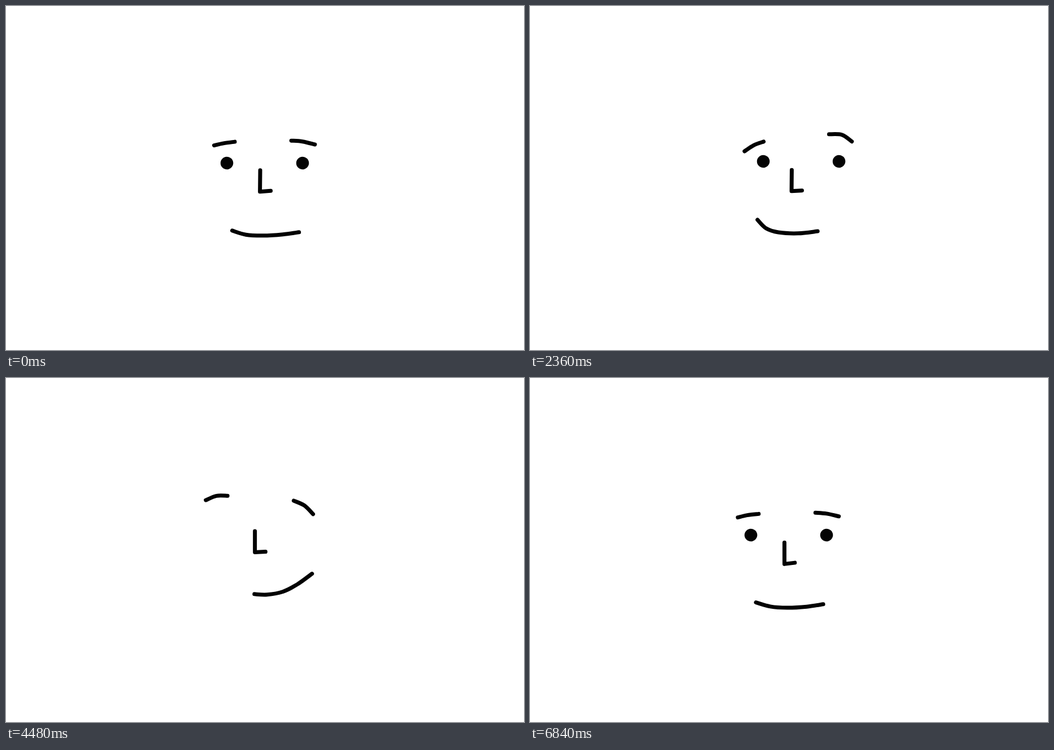
An HTML page that plays this animation: 917x611 px, repeating every 6880 ms.

```html
<!DOCTYPE html>
<html lang="en">
<head>
<meta charset="utf-8">
<title>Face</title>
<style>
  html, body { margin: 0; width: 100%; height: 100%; overflow: hidden; background: #fff; }
  svg { display: block; width: 100vw; height: 100vh; }
  .line { fill: none; stroke: #020202; stroke-width: 7; stroke-linecap: round; stroke-linejoin: round; }
  .eye { fill: #040404; }
</style>
</head>
<body>
<svg viewBox="0 0 917 611">
  <path class="line" id="browL"/>
  <path class="line" id="browR"/>
  <path class="line" id="nose"/>
  <path class="line" id="mouth"/>
  <path class="eye" id="eyeL"/>
  <path class="eye" id="eyeR"/>
</svg>
<script>
const LOOP = 6880, STEP = 40, EYE_R = 11.3, EYE_GAP = 134, LID_TILT = -13;
const el = id => document.getElementById(id);

// Flat x,y lists; eye is the left eye's offset from the top of the nose.
const POSES = {
  calm: {
    browL: [368, 248, 385, 244, 405, 241], browR: [505, 239, 525, 241, 547, 246],
    nose: [450, 292], eye: [-59, -13],
    mouth: [400, 399, 425, 406, 455, 408, 490, 406, 519, 402]
  },
  dip: {
    browL: [365, 288, 384, 287, 402, 286], browR: [493, 280, 514, 280, 536, 282],
    nose: [440, 311], eye: [-59, -13],
    mouth: [391, 414, 412, 418, 440, 417, 472, 416, 510, 417]
  },
  glad: {
    browL: [380, 258, 396, 247, 414, 241], browR: [529, 228, 552, 229, 570, 241],
    nose: [463, 291], eye: [-50, -15],
    mouth: [403, 380, 418, 395, 440, 402, 475, 404, 509, 400]
  },
  squint: {
    browL: [391, 262, 410, 259, 429, 258], browR: [519, 250, 542, 250, 561, 256],
    nose: [465, 296], eye: [-51, -6],
    mouth: [409, 390, 427, 401, 450, 405, 485, 405, 520, 403]
  },
  beam: {
    browL: [354, 217, 373, 209, 392, 209], browR: [509, 218, 528, 226, 544, 242],
    nose: [441, 272], eye: [-50, -13],
    mouth: [440, 384, 462, 385, 490, 379, 516, 366, 542, 348]
  },
  lift: {
    browL: [365, 238, 384, 238, 403, 240], browR: [482, 237, 504, 236, 525, 239],
    nose: [435, 268], eye: [-59, -13],
    mouth: [434, 381, 458, 382, 485, 375, 512, 362, 536, 343]
  }
};

const EASE = {
  both: p => p * p * (3 - 2 * p),
  in: p => p * p,
  out: p => 1 - (1 - p) ** 2
};

// time, pose, shift x, shift y, easing towards the next key
const KEYS = [
  [0, 'calm', 0, 0], [1160, 'calm', 0, 0],
  [1430, 'dip', 0, 0], [1500, 'dip', 0, 4],
  [1720, 'glad', 2, -8], [2000, 'glad', 0, 0], [2360, 'glad', 0, 0],
  [2600, 'glad', 0, 8], [2880, 'glad', 0, -5], [3160, 'glad', 0, 0], [3240, 'glad', 0, 0],
  [3480, 'squint', 0, 7, 'in'], [3560, 'squint', 0, 0, 'out'],
  [3760, 'beam', -1, -5], [4040, 'beam', 0, 0], [5240, 'beam', 0, 0],
  [5520, 'lift', 0, 0], [5570, 'lift', 0, 0],
  [5790, 'calm', 4, 5], [6080, 'calm', 0, 0], [LOOP, 'calm', 0, 0]
];

// time, how far the eyes are open
const LIDS = [
  [0, 1], [1300, 1], [1400, 0], [1560, 0], [1680, 1], [3480, 1],
  [3560, 0.63], [3620, 0], [5600, 0], [5720, 1], [LOOP, 1]
];

const mix = (a, b, p) => a + (b - a) * p;

function segment(keys, t) {
  let i = 0;
  while (i < keys.length - 2 && t >= keys[i + 1][0]) i++;
  const a = keys[i], b = keys[i + 1];
  return [a, b, (t - a[0]) / (b[0] - a[0])];
}

// Repeatable wobble in -1..1
function wobble(n, tick) {
  const s = Math.sin(n * 12.9898 + tick * 78.233) * 43758.5453;
  return (s - Math.floor(s)) * 2 - 1;
}

const jitter = (pts, tick, seed) => pts.map((v, i) => v + 0.45 * wobble(seed + i, tick));

// Smooth curve through the points
function curve(p) {
  const last = p.length / 2 - 1;
  const at = i => { const k = 2 * Math.max(0, Math.min(last, i)); return [p[k], p[k + 1]]; };
  let d = 'M' + at(0);
  for (let i = 0; i < last; i++) {
    const [a, b, c, e] = [at(i - 1), at(i), at(i + 1), at(i + 2)];
    const c1 = b.map((v, k) => v + (c[k] - a[k]) / 6);
    const c2 = c.map((v, k) => v - (e[k] - b[k]) / 6);
    d += `C${c1} ${c2} ${c}`;
  }
  return d;
}

function drawEye(id, x, y, open) {
  const cut = EYE_R * (2 * Math.min(open, 0.999) - 1);
  const w = Math.sqrt(Math.max(0, EYE_R ** 2 - cut ** 2));
  const shape = `M${-w} ${cut}A${EYE_R} ${EYE_R} 0 ${cut > 0 ? 1 : 0} 1 ${w} ${cut}Z`;
  el(id).setAttribute('d', open > 0.02 ? shape : '');
  el(id).setAttribute('transform', `translate(${x} ${y}) rotate(${LID_TILT})`);
}

function render(ms) {
  const tick = Math.floor((ms % LOOP) / STEP), t = tick * STEP;
  const [a, b, raw] = segment(KEYS, t);
  const p = EASE[a[4] || 'both'](raw);
  const shift = [mix(a[2], b[2], p), mix(a[3], b[3], p)];
  const part = name => POSES[a[1]][name].map((v, i) => mix(v, POSES[b[1]][name][i], p));
  const placed = name => part(name).map((v, i) => v + shift[i % 2]);

  ['browL', 'browR', 'mouth'].forEach((name, i) =>
    el(name).setAttribute('d', curve(jitter(placed(name), tick, i * 20 + 1))));

  const [nx, ny] = placed('nose');
  const n = jitter([nx, ny, nx, ny + 38, nx + 18.5, ny + 36.5], tick, 71);
  el('nose').setAttribute('d', `M${n[0]} ${n[1]}L${n[2]} ${n[3]}L${n[4]} ${n[5]}`);

  const [ex, ey] = part('eye');
  const [l0, l1, lp] = segment(LIDS, t);
  const open = mix(l0[1], l1[1], lp);
  drawEye('eyeL', nx + ex, ny + ey, open);
  drawEye('eyeR', nx + ex + EYE_GAP, ny + ey, open);
}

const start = performance.now();
function loop() {
  render(performance.now() - start);
  requestAnimationFrame(loop);
}
loop();
</script>
</body>
</html>
```
